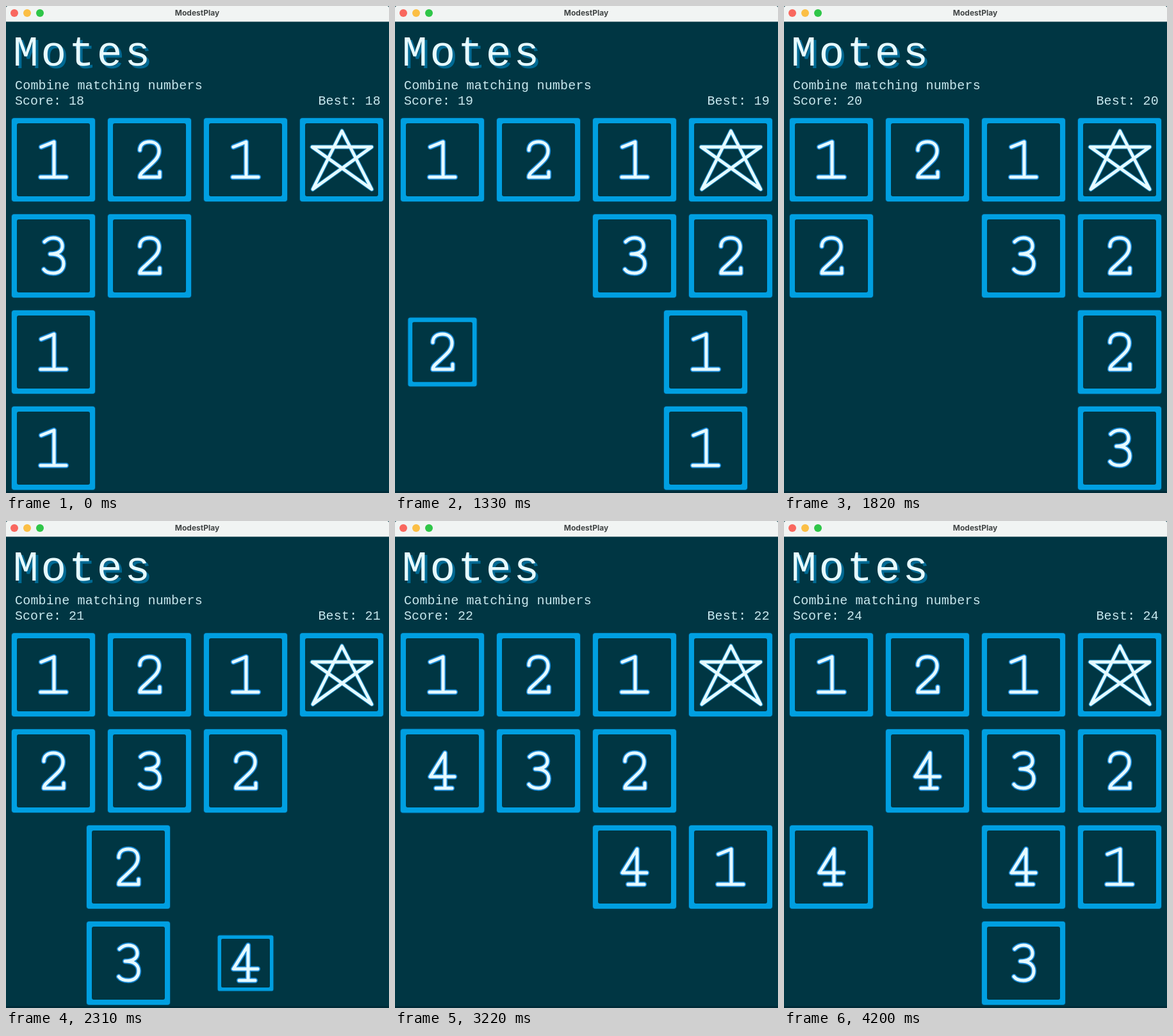
An HTML page with a canvas for the animation above (4270 ms loop, 598 by 760 pixels).

```html
<!DOCTYPE html>
<html lang="en">
<head>
<meta charset="utf-8">
<title>ModestPlay</title>
<style>
  html, body { margin: 0; height: 100%; overflow: hidden; background: #003643; }
  canvas { display: block; }
</style>
</head>
<body>
<canvas id="stage" width="598" height="760"></canvas>
<script>
const ctx = document.getElementById('stage').getContext('2d');
const LOOP = 4270;
const SPEED = 3;        // px per ms
const GROW = 500 / 3;   // ms until a new tile has its full size
const PITCH = 150, SIZE = 130, BORDER = 8;
const BACK = '#003643', BLUE = '#009fe1', WHITE = '#e6faff';
const MONO = '"Liberation Mono", monospace';

const STAR = 0;
const glyphs = [
  'M0.5,-45 L47,46 L-46,-20 H47 L-45,46 Z',
  'M-19,-20 L1,-28 V27 M-20,27 H20',
  'M-15,-15 C-15,-24 -8,-28 0,-28 C10,-28 15,-22 15,-14 C15,-4 8,2 -2,11 C-10,19 -15,21 -15,27 H16 V19',
  'M-14,-22 C-9,-27 -4,-28 0,-28 C10,-28 14,-22 14,-15 C14,-7 6,-3 -5,-3 C8,-3 16,2 16,12 C16,21 10,27 0,27 C-6,27 -12,25 -15,21',
  'M4,27 V-28 L-19,9 H19 M-10,27 H15'
].map(d => new Path2D(d));

const UP = [-1, 0], LEFT = [0, -1], RIGHT = [0, 1];
const tile = (value, row, col) => ({ value, row, col });
const moves = [
  { time: 1194, dir: RIGHT, spawn: tile(2, 2, 0) },
  { time: 1600, dir: UP, spawn: tile(3, 3, 3) },
  { time: 2200, dir: LEFT, spawn: tile(4, 3, 2) },
  { time: 2700, dir: UP, spawn: tile(1, 2, 3) },
  { time: 3485, dir: RIGHT, spawn: tile(3, 3, 2) },
  { time: 3960, dir: UP, spawn: tile(4, 2, 0) }
];
let board = [
  tile(1, 0, 0), tile(2, 0, 1), tile(1, 0, 2), tile(STAR, 0, 3),
  tile(3, 1, 0), tile(2, 1, 1), tile(1, 2, 0), tile(1, 3, 0)
];

// Slides every tile as far as it goes; equal tiles merge into the next number.
function slide(tiles, [dr, dc]) {
  const inside = n => n >= 0 && n < 4;
  const depth = t => t.row * dr + t.col * dc;
  const placed = [], sprites = [];
  for (const from of [...tiles].sort((a, b) => depth(b) - depth(a))) {
    let to = { ...from };
    while (true) {
      const row = to.row + dr, col = to.col + dc;
      if (!inside(row) || !inside(col)) break;
      const hit = placed.find(p => p.row === row && p.col === col);
      if (hit && hit.value !== from.value) break;
      if (hit) { hit.value++; to = hit; break; }
      to.row = row;
      to.col = col;
    }
    if (!placed.includes(to)) placed.push(to);
    const distance = PITCH * (Math.abs(to.row - from.row) + Math.abs(to.col - from.col));
    sprites.push({ from, distance, endValue: to.value });
  }
  return { placed, sprites };
}

const scenes = [{ time: 0, dir: UP, sprites: board.map(from => ({ from, distance: 0, endValue: from.value })) }];
for (const { time, dir, spawn } of moves) {
  const { placed, sprites } = slide(board, dir);
  scenes.push({ time, dir, sprites, spawn });
  board = [...placed, spawn];
}

function drawTile(value, x, y, scale = 1) {
  ctx.save();
  ctx.translate(x + SIZE / 2, y + SIZE / 2);
  const box = (size, radius, color) => {
    ctx.fillStyle = color;
    ctx.beginPath();
    ctx.roundRect(-size / 2, -size / 2, size, size, radius);
    ctx.fill();
  };
  ctx.shadowColor = '#0079b8';
  ctx.shadowBlur = 2;
  box(SIZE * scale, 4 * scale, BLUE);
  ctx.shadowBlur = 0;
  box((SIZE - 2 * BORDER) * scale, 3 * scale, BACK);

  ctx.lineCap = ctx.lineJoin = 'round';
  const layers = value === STAR
    ? [[7, '#087fb5'], [4.8, WHITE]]
    : [[8.4, '#1686d2'], [5, WHITE]];
  for (const [width, color] of layers) {
    ctx.lineWidth = width;
    ctx.strokeStyle = color;
    ctx.stroke(glyphs[value]);
  }
  ctx.restore();
}

function write(text, x, y, font, color, align = 'left', spacing = 0) {
  ctx.font = font;
  ctx.fillStyle = color;
  ctx.textAlign = align;
  ctx.letterSpacing = spacing + 'px';
  ctx.fillText(text, x, y);
}

function drawWindow(score) {
  ctx.fillStyle = BACK;
  ctx.fillRect(0, 0, 598, 760);
  ctx.fillStyle = '#002b38';
  ctx.fillRect(0, 757, 598, 3);
  ctx.fillStyle = '#f1f4f3';
  ctx.beginPath();
  ctx.roundRect(0, 0, 598, 24.6, [3, 3, 0, 0]);
  ctx.fill();
  ['#f9685f', '#fbbf45', '#2fc648'].forEach((color, i) => {
    ctx.fillStyle = color;
    ctx.beginPath();
    ctx.arc(13 + 20 * i, 11, 6, 0, 7);
    ctx.fill();
  });
  write('ModestPlay', 298.5, 15, 'bold 12px Inter, sans-serif', '#414545', 'center');

  const big = '66px ' + MONO, small = '20px ' + MONO, pale = '#c9e9ef';
  write('Motes', 15, 97, big, '#006a94', 'left', 4);
  write('Motes', 11, 93, big, WHITE, 'left', 4);
  write('Combine matching numbers', 14, 130, small, pale, 'left', 0.2);
  write('Score: ' + score, 14, 154, small, pale);
  write('Best: ' + score, 585, 154, small, pale, 'right', 0.2);
}

function draw(time) {
  const index = scenes.findLastIndex(s => s.time <= time);
  const { time: start, dir: [dr, dc], sprites, spawn } = scenes[index];
  const age = time - start;
  drawWindow(18 + index);
  const place = (value, { row, col }, moved = 0, scale = 1) =>
    drawTile(value, 9 + col * PITCH + dc * moved, 175 + row * PITCH + dr * moved, scale);
  for (const { from, distance, endValue } of sprites) {
    const moved = Math.min(distance, age * SPEED);
    place(moved < distance ? from.value : endValue, from, moved);
  }
  if (spawn) place(spawn.value, spawn, 0, Math.min(1, age / GROW));
}

const begin = performance.now();
function tick() {
  draw((performance.now() - begin) % LOOP);
  requestAnimationFrame(tick);
}
tick();
</script>
</body>
</html>
```
